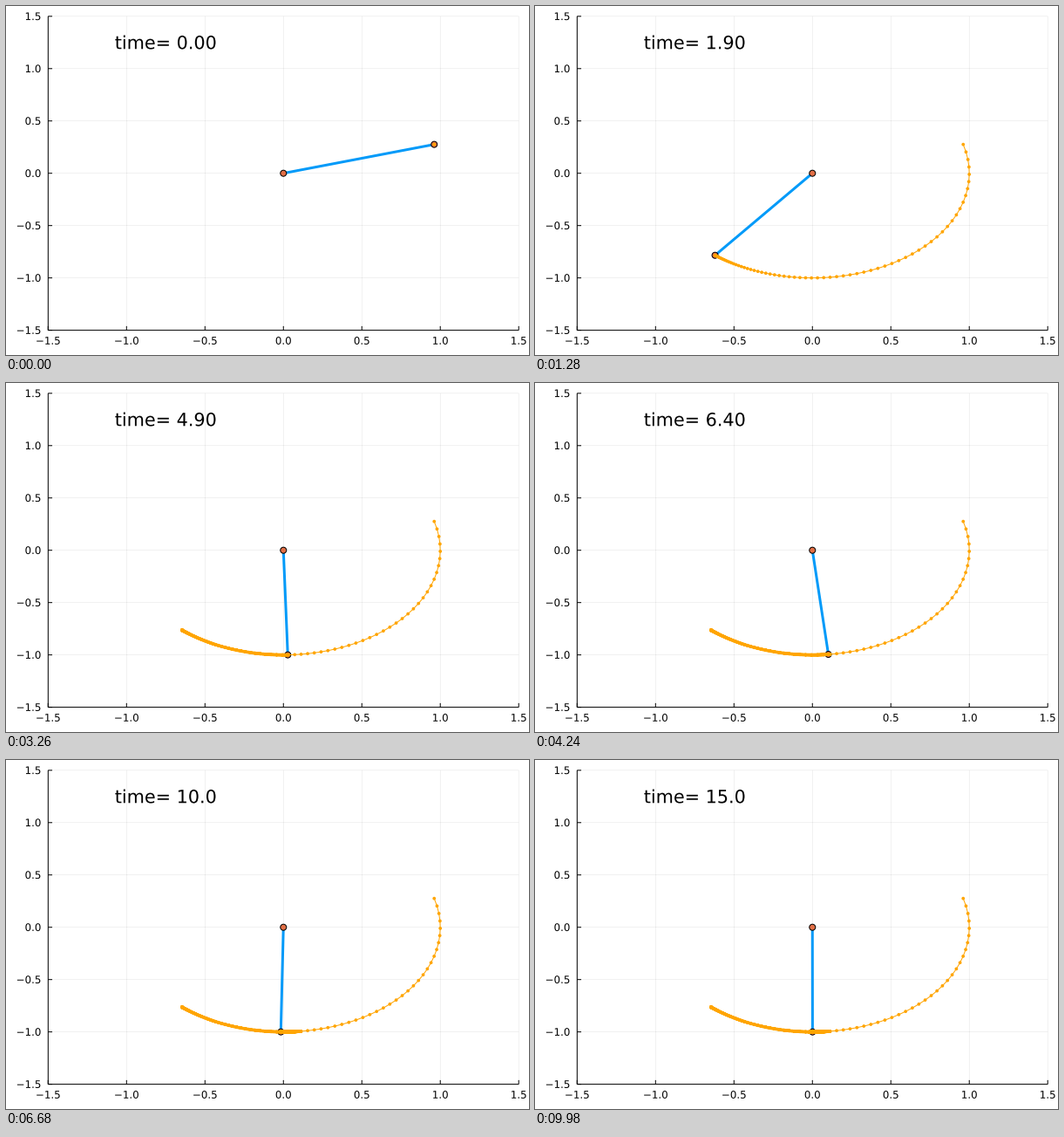
A matplotlib script that plays this animation: 600x400 px, repeating every 10 s.

```python
import numpy as np
import matplotlib.pyplot as plt
from matplotlib.animation import FuncAnimation
from matplotlib.collections import LineCollection
from matplotlib.patches import Circle, PathPatch
from matplotlib.path import Path
from matplotlib.textpath import TextPath
from matplotlib.transforms import Affine2D

plt.rcParams["font.family"] = "DejaVu Sans"
plt.rcParams["path.snap"] = False

WIDTH, HEIGHT, DPI = 600, 400, 100
PX = 72 / DPI
FRAMES, DT = 500, 0.03
LEFT, RIGHT, TOP, BOTTOM = 48.32, 588.19, 11.81, 371.61
LIMIT = 1.5
TICKS = np.arange(-1.5, 1.6, 0.5)
TICK_LEN = 4.72
LABEL_SIZE, TIME_SIZE = 11.85, 20.74
BLUE, SALMON, ORANGE = "#009AF9", "#E26F46", "#FFA500"
DOT_RADIUS = 1.9


def to_px(x, y):
    """Map plot units to stage pixels, y pointing down."""
    px = LEFT + (x + LIMIT) / (2 * LIMIT) * (RIGHT - LEFT)
    py = BOTTOM - (y + LIMIT) / (2 * LIMIT) * (BOTTOM - TOP)
    return px, py


def slope(state):
    theta, omega = state
    return np.array([omega, -np.sin(theta) - omega])


def swing(theta, omega):
    """Angles of a damped pendulum, one per frame (RK4)."""
    state = np.array([theta, omega])
    angles = []
    for _ in range(FRAMES):
        angles.append(state[0])
        k1 = slope(state)
        k2 = slope(state + DT / 2 * k1)
        k3 = slope(state + DT / 2 * k2)
        k4 = slope(state + DT * k3)
        state = state + DT / 6 * (k1 + 2 * k2 + 2 * k3 + k4)
    return np.array(angles)


def text_path(text, x, baseline, size, align):
    """Text outline in pixels; align 0.5 is centred, 1 is right."""
    start = x - align * advance(text) * size
    flip = Affine2D().scale(1, -1).translate(start, baseline)
    return flip.transform_path(TextPath((0, 0), text, size=size))


def advance(text):
    """Advance width in em of the characters used here."""
    widths = {"t": 0.392, "i": 0.278, "m": 0.974, "e": 0.615, "=": 0.838,
              "\u2212": 0.838, " ": 0.318, ".": 0.318}
    return sum(widths.get(c, 0.636) for c in text)


def time_path(frame):
    t = round(frame * DT, 2)
    digits = 2 if t < 1 else 1 if t < 9.95 else 0
    value = str(float(np.round(t, digits))).ljust(4, "0")
    x, y = to_px(-0.75, 1.25)
    return text_path("time= " + value, x, y + 0.36 * TIME_SIZE, TIME_SIZE, 0.5)


fig = plt.figure(figsize=(WIDTH / DPI, HEIGHT / DPI), dpi=DPI, facecolor="white")
ax = fig.add_axes([0, 0, 1, 1])
ax.set_xlim(0, WIDTH)
ax.set_ylim(HEIGHT, 0)
ax.axis("off")

# Grid, frame and tick labels
grid, rules, labels = [], [], []
for v in TICKS:
    x, y = to_px(v, v)
    grid += [[(x, TOP), (x, BOTTOM)], [(LEFT, y), (RIGHT, y)]]
    rules += [[(x, BOTTOM), (x, BOTTOM - TICK_LEN)], [(LEFT, y), (LEFT + TICK_LEN, y)]]
    name = f"{v:.1f}".replace("-", "\u2212")
    labels.append(text_path(name, x, 387.8, LABEL_SIZE, 0.5))
    labels.append(text_path(name, 40.4, y + 0.36 * LABEL_SIZE, LABEL_SIZE, 1))
rules += [[(LEFT, BOTTOM), (RIGHT, BOTTOM)], [(LEFT, BOTTOM), (LEFT, TOP)]]

ax.add_collection(LineCollection(grid, colors=[(0, 0, 0, 0.1)], linewidths=0.55 * PX,
                                 zorder=1), autolim=False)
ax.add_collection(LineCollection(rules, colors="black", linewidths=PX,
                                 capstyle="butt", zorder=2), autolim=False)
ax.add_patch(PathPatch(Path.make_compound_path(*labels), fc="black", lw=0, zorder=2))

# Pendulum
angles = swing(1.85, -2.5)
track = np.column_stack(to_px(np.sin(angles), -np.cos(angles)))
pivot = to_px(0, 0)

rod, = ax.plot([], [], color=BLUE, lw=3 * PX, solid_capstyle="butt", zorder=3)
ball = dict(radius=3.5, fc=SALMON, ec="black", lw=PX, zorder=4)
ax.add_patch(Circle(pivot, **ball))
bob = ax.add_patch(Circle(pivot, **ball))
trail, = ax.plot([], [], color=ORANGE, lw=PX, solid_capstyle="butt", zorder=5)
dots = ax.add_patch(PathPatch(Path([(0, 0)]), fc=ORANGE, lw=0, zorder=6))
clock = ax.add_patch(PathPatch(time_path(0), fc="black", lw=0, zorder=7))

# One closed ring per trail dot
turn = np.linspace(0, 2 * np.pi, 17)
ring = DOT_RADIUS * np.column_stack([np.cos(turn), np.sin(turn)])
ring_codes = [Path.MOVETO] + [Path.LINETO] * 15 + [Path.CLOSEPOLY]


def draw(frame):
    past = track[:frame + 1]
    tip = past[-1]
    rod.set_data([pivot[0], tip[0]], [pivot[1], tip[1]])
    bob.center = tuple(tip)
    trail.set_data(past[:, 0], past[:, 1])
    rings = (past[:, None, :] + ring).reshape(-1, 2)
    dots.set_path(Path(rings, np.tile(ring_codes, len(past))))
    clock.set_path(time_path(frame))
    return rod, bob, trail, dots, clock


anim = FuncAnimation(fig, draw, frames=FRAMES, interval=20, repeat=True,
                     cache_frame_data=False)
plt.show()
```
